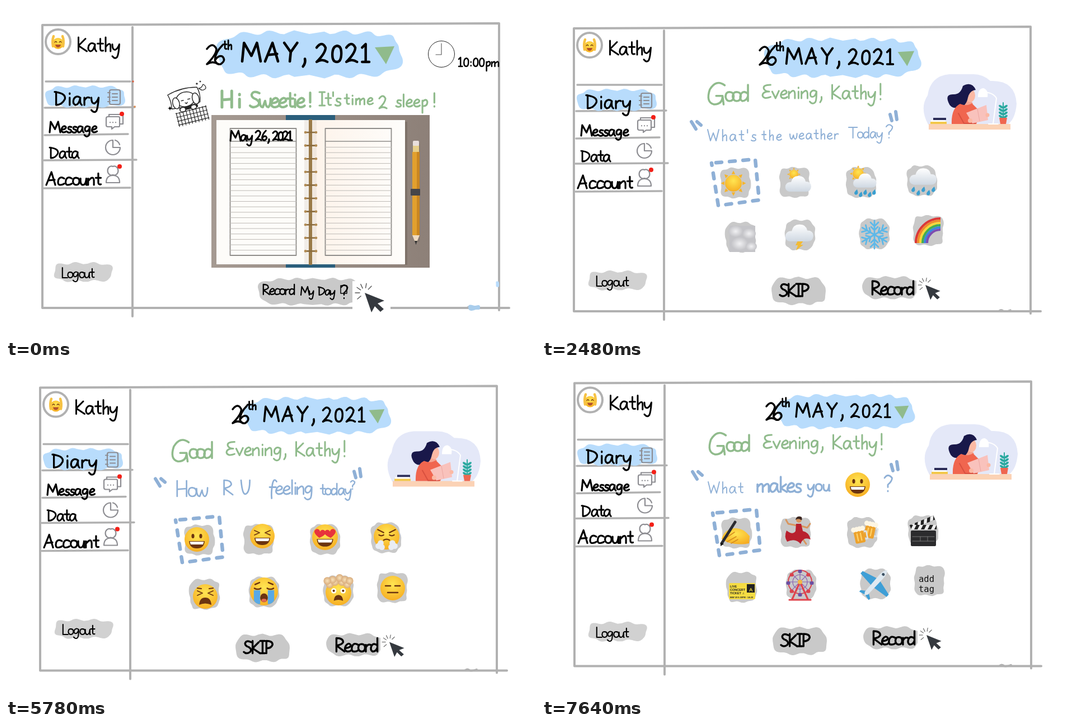
Recreate the animation shown at these times as an HTML page. Size 947 px wide and 592 px high, loop 8000 ms.

```html
<!DOCTYPE html>
<html lang="en">
<head>
<meta charset="utf-8">
<title>Diary wireframe</title>
<style>
html, body { margin: 0; width: 100%; height: 100%; overflow: hidden; background: #fff; }
svg { display: block; width: 100%; height: 100%; }
path, g { stroke-linecap: round; stroke-linejoin: round; }
</style>
</head>
<body>
<svg id="stage" viewBox="0 0 947 592"></svg>
<script>
const GRAY = '#b1b1b1', PATCH = '#c9c9c9', SKY = '#b8dcfc', GREEN = '#90bb8c', BLUE = '#8fb0d6', BROWN = '#6b3410', INK = '#000';

// Handwriting strokes: advance width | path, with cap height 10 and baseline y = 10.
const capitals = {
  A: '8|M0 10L4 0L7 10M1.5 6.5L6.5 6', D: '8|M1 1V10M0 1Q8 2 7 6Q5 10 1 10',
  E: '6|M6 0Q0 0 1 3Q2 5 5 5Q0 5 0 8Q1 11 6 9', G: '9|M8 1Q4-2 1 3Q-1 9 3 10Q7 10 7 6L4 6M7 6L7.5 10',
  H: '8|M1 0V10M7 0V10M1 5.5L7 5', I: '4|M0 0H4M2 0V10M0 10H4', K: '7|M1 0V10M6 1L1 6L7 10',
  L: '6|M1 0V10H6', M: '10|M0 10L1 0L5 7L8 0L10 10', P: '6|M1 10V0Q6 0 6 3Q5 6 1 6',
  R: '7|M1 10V0Q6 0 6 3Q5 5 1 5.5L7 10', S: '6|M6 1Q2-1 1 2Q1 4 4 5Q7 7 5 9Q2 11 0 9',
  T: '8|M0 0H8M4 0V10', V: '7|M0 0Q1 12 4 9Q6 7 6 0', W: '10|M0 0L2.5 10L5 3L7.5 10L10 0',
  Y: '7|M0 0L3.5 5L7 0M3.5 5L3 10'
};
const smalls = {
  a: '6|M5 5Q2 3 .5 6Q-.5 9 1.5 10Q4 10 5 5Q4.5 9 6 10', c: '5|M5 5Q2 3 .5 6Q-.5 10 2 10Q4 10 5 9',
  d: '6|M5 5.5Q2 3 .5 6Q-.5 9 1.5 10Q4 10 5 7M5 0V10', e: '5|M.5 7.5Q5 7 4.5 5Q3 3 1 5.5Q-1 9 2 10Q4 10 5 9',
  f: '4|M5 1Q3-2 2 3Q1 9 1.5 13M0 5H4.5', g: '6|M5 5Q2 3 .5 6Q0 9 2 9Q4 9 5 5Q5 12 4 13Q2 15 0 12.5',
  h: '5|M1 0V10M1 7Q4 3 4.5 6V10', i: '2|M1 5V10M1 2V2.4', k: '5|M1 0V10M4.5 5L1 7.5L5 10', l: '2|M1 0V10',
  m: '8|M0 5V10M0 7Q3 3 3.5 6V10M3.5 7Q7 3 7.5 6V10', n: '5|M0 5V10M0 7Q4 2 4.5 6.5V10',
  o: '5|M3 4.5Q0 4 0 7.5Q.5 10 2.5 10Q5 10 5 7Q5 4.5 2.5 4.5', p: '5|M1 5V15M1 6Q4 3 5 6Q5 10 1 9.5',
  r: '4|M.5 5V10M.5 7Q2 4 4 5', s: '4|M4 5Q1 4 1 6Q1 7 3 7.5Q5 9 3 10Q1 10.5 0 9.5',
  t: '4|M2 1V8Q2 10 4 9.5M0 4.5H4', u: '5|M0 5Q-.5 10 2 10Q4 10 4.5 5V10H5', v: '5|M0 5L2.5 10L5 4.5',
  w: '7|M0 5Q0 10 2 10L3.5 6Q4 10 5.5 10Q7 9 7 4.5', y: '5|M0 5Q0 9 2 9Q4 8 5 5Q4.5 12 3.5 14Q2 16 0 13.5'
};
const signs = {
  0: '5|M3 1Q0 1 0 6Q0 10 2.5 10Q5 10 5 5Q5 1 2.5 1', 1: '4|M0 2L2 0V10M0 10H4',
  2: '6|M0 2Q3-2 5 2Q5 5 0 10Q3 8 6 10', 6: '5|M4 0Q0 4 0 8Q1 10.5 3 10Q6 8 4 6Q2 5 0 8',
  ',': '2|M1.5 9Q2 11 .5 13', '!': '2|M1 0V7M1 9.6V10', "'": '2|M1 0V3', ':': '2|M1 5V5.3M1 9V9.4',
  '?': '5|M0 2Q2-1 4.5 2Q4.5 4 2 6V7.5M2 9.7V10'
};
const glyphs = { ...capitals, ...smalls, ...signs };

const fill = (d, c) => `<path d="${d}" fill="${c}"/>`;
const line = (d, c, w, extra = '') => `<path d="${d}" fill="none" stroke="${c}" stroke-width="${w}" ${extra}/>`;
const oval = (x, y, rx, ry, c, extra = '') => `<ellipse cx="${x}" cy="${y}" rx="${rx}" ry="${ry}" fill="${c}" ${extra}/>`;
const dot = (x, y, r, c, extra) => oval(x, y, r, r, c, extra);
const rect = (x, y, w, h, c, extra = '') => `<rect x="${x}" y="${y}" width="${w}" height="${h}" fill="${c}" ${extra}/>`;
const at = (x, y, body, s = 1, turn = 0) => `<g transform="translate(${x} ${y}) rotate(${turn}) scale(${s})">${body}</g>`;
const repeat = (n, draw) => Array.from({ length: n }, (_, i) => draw(i)).join('');
const outline = (c, w) => `stroke="${c}" stroke-width="${w}"`;

function hand(text, x, baseline, size, gap, color, width) {
  let pen = 0;
  const letters = [...text].map(ch => {
    const [advance, d] = glyphs[ch].split('|');
    const letter = `<path d="${d}" transform="translate(${pen} 0)"/>`;
    pen += +advance + gap;
    return letter;
  }).join('');
  return `<g aria-label="${text}" fill="none" ${outline(color, width * 10 / size)}>${at(x, baseline - size, letters, size / 10)}</g>`;
}

// Marker scribble: rounded box with a softly wavy rim.
function blob(x, y, w, h, color, ripple = 3.5, depth = 1.3) {
  const curve = v => Math.sign(v) * Math.abs(v) ** .5;
  const points = Array.from({ length: 240 }, (_, i) => {
    const a = i / 120 * Math.PI;
    const u = curve(Math.cos(a)), v = curve(Math.sin(a));
    const px = x + w / 2 * (1 + u), py = y + h / 2 * (1 + v);
    const wave = depth * Math.sin(px / ripple + 2 * Math.sin(py / ripple / 2));
    return (px + wave * u).toFixed(1) + ' ' + (py + wave * v).toFixed(1);
  });
  return fill('M' + points.join('L') + 'Z', color);
}

function avatar() {
  return dot(93, 64, 22, '#fff', outline(GRAY, 4)) + dot(93, 67, 10, 'url(#skin)') +
    line('M84 72Q82 62 85 54M102 72Q104 62 101 54', '#f6c244', 4.5) +
    line('M87 65Q89 62 91 65M95 65Q97 62 99 65', BROWN, 1.3) + fill('M88 69H98Q97 74 93 74Q89 74 88 69', '#b4512a');
}

function sidebar() {
  const icon = d => line(d, '#8d8d92', 2.2);
  return line('M65 64V34L881 31V544M65 34V540L899 540M226 38V555', GRAY, 4) +
    line('M71 135H222M69 182L230 181M69 231L218 229M68 276L233 275M68 326L222 325M825 539Q829 536 833 540Q839 541 845 538', GRAY, 3.4) +
    avatar() + hand('Kathy', 127, 81, 25, .8, INK, 3) +
    blob(72, 144, 141, 36, SKY, 5, 2) + hand('Diary', 87, 177, 26, 1.3, INK, 3.3) +
    hand('Message', 78, 226, 19, .75, INK, 3.2) + hand('Data', 78, 272, 21, .3, INK, 2.9) + hand('Account', 72, 320, 23, .9, INK, 3.2) +
    icon('M188 150H201Q204 150 204 153V173Q204 176 201 176H188Q185 176 185 173V153Q185 150 188 150ZM190 157H199M190 163H199M190 169H199M182 155H186M182 163H186M182 171H186') +
    icon('M182 198H201Q203 198 203 200V214Q203 216 201 216H194L189 220V216H182Q179 216 179 213V201Q179 198 182 198ZM184 198V194H209V211H204M186 208V208.3M191 208V208.3M196 208V208.3') +
    icon('M191 240A13 13 0 1 0 204 253H191ZM195 240A12 12 0 0 1 203 248') +
    icon('M191 287A7 8 0 1 0 191 302A7 8 0 1 0 191 287M179 316Q179 303 191 303Q203 303 203 316Z') +
    dot(207, 193, 4, '#f32018') + dot(203, 287, 4, '#f32018');
}

const logout = blob(86, 460, 104, 32, '#d1d1d1', 5, 2) + hand('Logout', 99, 486, 18, .3, INK, 2.1);

function dateHeader(x, y, scale, dayX, dayBase, daySize) {
  const body = blob(2, 3, 328, 79, SKY, 7, 3.5) + fill('M283 30L318 28L303 60Z', GREEN);
  return at(x, y, body, scale) +
    hand('MAY', x + 46 * scale, y + 55 * scale, 33 * scale, 2.4, INK, 4.6 * scale) +
    hand(',', x + 153 * scale, y + 54 * scale, 34 * scale, 0, INK, 4.6 * scale) +
    hand('2021', x + 179 * scale, y + 56 * scale, 32 * scale, 2.8, INK, 4.4 * scale) +
    hand('26', dayX, dayBase, daySize, -1.8, INK, 3.5) + hand('th', dayX + daySize * .85, dayBase - daySize * .78, 16, .8, INK, 2.8);
}

function cursor(x, y, scale) {
  const rays = [140, 180, 215, 245, 280, 315].map(a => `<g transform="rotate(${a})">${line('M9 0H17', '#555', 1.4)}</g>`).join('');
  return at(x, y, rays + fill('M0 0L35 14L23 19L34 29L28 34L18 24L12 35Z', '#35393f'), scale);
}

function puppy() {
  const ink = (d, w = 1.4) => line(d, '#222', w);
  const body = ink('M-31-25Q-4-33 23-26Q27-13 22 1Q-4 5-30 1Q-27-12-31-25Z') +
    oval(-2, -10, 17, 13, '#fff', outline('#222', 1.4)) +
    oval(-20, -7, 6, 10, '#fff', outline('#222', 1.4)) + oval(16, -7, 6, 10, '#fff', outline('#222', 1.4)) +
    ink('M-10-9H-6M2-9H6M-4-4L-2-2L0-4') + rect(-17, 3, 34, 6, '#222', 'rx="3"') +
    oval(-11, 7, 5, 4, '#fff', outline('#222', 1.4)) + oval(9, 7, 5, 4, '#fff', outline('#222', 1.4)) +
    repeat(10, i => ink(`M${-24 + i * 6} 10V35`, 1.2)) + repeat(4, i => ink(`M-25 ${11 + i * 7}H31`, 1.2));
  const star = 'M0-5Q0 0 5 0Q0 0 0 5Q0 0-5 0Q0 0 0-5Z';
  return at(325, 176, body, 1, -14) + at(293, 183, fill(star, INK)) + at(341, 139, fill(star, INK), .6) +
    at(347, 135, fill(star, INK), .5) + ink('M352 140Q349 148 344 147Q352 154 357 147Q357 142 352 140Z', 1.2);
}

function notebook() {
  const page = x => rect(x, 219, 118, 227, 'none', outline('#8f8d8a', 1.8)) + line(`M${x} 242H${x + 118}`, '#8f8d8a', 1.5) +
    repeat(20, i => line(`M${x} ${252.5 + i * 9.7}H${x + 118}`, '#bdbab6', 1));
  const ring = i => {
    const y = 226 + i * 23.6;
    return line(`M536 ${y}H553`, '#8a6b3d', 2.6) + dot(535, y, 2.3, '#b28b52') + dot(554, y, 2.3, '#b28b52');
  };
  const pencil = line('M735 248V418', '#6f635b', 9, 'opacity=".35"') + rect(727, 241, 11, 10, '#e9dfdc', 'rx="2"') +
    rect(727, 250, 11, 12, '#e7cf8a') + rect(726, 261, 13, 149, '#e2a02e') + rect(734, 261, 5, 149, '#c98622') +
    fill('M726 410H739L732.5 426Z', '#f0dcc2') + fill('M730 420H735L732.5 427Z', '#333') + rect(723, 327, 17, 12, '#46464a', 'rx="1"');
  return rect(367, 195, 390, 273, 'url(#table)') + rect(500, 195, 88, 273, '#2b5f7c') +
    rect(712, 207, 5, 256, '#6e6259', 'opacity=".5"') + rect(376, 204, 168, 258, '#fdfcf9') + rect(545, 204, 168, 258, 'url(#page)') +
    rect(533, 204, 22, 258, '#d9d2c8', 'opacity=".35"') + rect(541, 203, 6, 260, '#9a7a48') +
    page(400.5) + page(570.5) + repeat(10, ring) + pencil +
    hand('May', 401, 241, 18, .3, INK, 3) + hand('26,', 446, 240, 17, .8, INK, 3) + hand('2021', 477, 240, 16, .1, INK, 3);
}

function home() {
  return dateHeader(376, 44, 1, 359, 104, 34) +
    dot(778, 86, 23.5, '#fff', outline('#222', 1)) + line('M778 67V87H768', '#555', 1.1) + hand('10:00pm', 809, 108, 16, 1.8, INK, 2.5) +
    puppy() + hand('Hi', 383, 181, 29, 2.8, GREEN, 5) + hand('Sweetie', 436, 181, 28, .15, GREEN, 4.2) + hand('!', 541, 180, 25, 0, GREEN, 4.2) +
    hand("It's", 560, 178, 24, .6, GREEN, 3.1) + hand('time', 605, 176, 20, 2.1, GREEN, 3.1) + hand('2', 667, 183, 22, 0, GREEN, 3.1) +
    hand('sleep', 697, 180, 22, 1.1, GREEN, 3.1) + hand('!', 763, 180, 24, 0, GREEN, 3.3) + notebook() +
    blob(451, 488, 194, 46, PATCH, 5, 2) + hand('Record', 458, 516, 18, .15, INK, 2.3) + hand('My', 527, 517, 15, 0, INK, 2.2) +
    hand('Day', 558, 517, 16, -.3, INK, 2.2) + hand('?', 599, 523, 25, 0, INK, 2.3) + line('M598 500V514H609V500Z', INK, 1.5) +
    rect(619, 492, 68, 60, '#fff') + cursor(641, 513, 1) +
    dot(227, 135, 1.7, '#d65a3c') + dot(230, 180, 1.8, '#e08a4c') + blob(827, 535, 19, 9, '#a9cdec', 3, 1) + blob(875, 492, 6, 11, SKY, 3, .5);
}

function reader() {
  const leaves = repeat(4, i => oval(820, 180 + i * 6, 4.5, 2, '#2ba9a0', `transform="rotate(35 820 ${180 + i * 6})"`) +
    oval(828, 180 + i * 6, 4.5, 2, '#2ba9a0', `transform="rotate(-35 828 ${180 + i * 6})"`));
  return fill('M690 212Q674 182 689 160Q694 125 728 122H771Q788 122 801 134Q846 132 848 175Q846 202 832 212Z', '#e4e8f8') +
    rect(691, 211, 146, 10, '#fbd2b5') + rect(699, 200, 23, 4, '#2b2c58') + rect(695, 204, 26, 4, '#fff') + rect(694, 207, 29, 4, '#f3c84b') +
    line('M787 154Q806 154 812 165L806 211M798 211H815', '#fff', 2) + fill('M779 163Q779 147 789 147Q798 150 796 163Z', '#fff') +
    fill('M760 164L770 174L765 184L749 183L754 168Z', '#f5a491') + oval(765, 160, 9, 12, '#fbb9a4') +
    fill('M775 150Q768 134 752 143Q748 158 736 158Q720 157 726 172Q731 186 747 181Q758 179 761 164Q764 151 775 150Z', '#19184a') +
    fill('M732 211Q731 183 747 175Q759 180 768 174L784 190L776 211Z', '#f0664f') +
    line('M744 192L754 210H774', '#d9503f', 2) + fill('M758 191L794 177L797 204L769 210Z', '#f9c2bc') + line('M778 184L782 206', '#eda7a2', 1) +
    dot(765, 205, 4, '#fbb9a4') + dot(796, 195, 3.5, '#fbb9a4') + line('M824 173V201', '#2ba9a0', 2) + leaves + fill('M817 200H831L829 211H819Z', '#ef6650');
}

const tiles = [[319, 290], [425, 289], [543, 289], [652, 286], [328, 387], [434, 383], [567, 381], [664, 375]];

function questionPage() {
  return hand('G', 296, 176, 38, 0, GREEN, 3.6) + hand('ood', 328, 170, 29, -.6, GREEN, 3.6) + hand('Evening,', 394, 165, 24, 1.2, GREEN, 3) +
    hand('Kathy', 516, 166, 25, 1.2, GREEN, 3) + hand('!', 602, 167, 28, 0, GREEN, 3) + reader() +
    line('M267 207L275 220M277 207L284 213M622 194L625 205M632 189L634 203', BLUE, 6) +
    line('M303 281L381 274L388 347L315 357Z', BLUE, 6.5, 'stroke-dasharray="10 14.2" stroke-dashoffset="-8"') +
    tiles.map(([x, y]) => blob(x, y, 53, 53, PATCH)).join('') +
    blob(412, 486, 93, 47, PATCH, 5, 2) + hand('SKIP', 425, 519, 22, .1, INK, 3.4) +
    blob(574, 485, 97, 38, PATCH, 5, 2) + hand('Record', 588, 516, 24, .1, INK, 3.4) + rect(669, 486, 44, 46, '#fff') + cursor(685, 499, .76);
}

const sun = (x, y, r) => at(x, y, repeat(8, i => `<g transform="rotate(${i * 45})">${fill(`M${-r * .22} ${-r * 1.08}L0 ${-r * 1.5}L${r * .22} ${-r * 1.08}Z`, '#f6b42a')}</g>`) + dot(0, 0, r, 'url(#skin)'));
const cloud = (x, y, s) => at(x, y, fill('M-16 13Q-25 11-23 2Q-20-5-13-4Q-10-16 1-15Q11-15 13-5Q23-5 23 4Q22 13 14 13Z', 'url(#cloud)'), s);
const drop = (x, y) => at(x, y, fill('M2-5Q5 2 2 4Q-2 6-3 2Q-3-1 2-5Z', '#3a9fd0'));

function weather() {
  const colors = ['#dc3838', '#f08a2c', '#f6d83a', '#45ae4c', '#3c86dc', '#7d4cb0'];
  const flakeArm = line('M0 0V-25M-7-22L0-15L7-22M-6-14L0-8L6-14', '#5db8e8', 2.8);
  const fog = [[346, 403, 13], [370, 407, 12], [353, 425, 15], [374, 430, 10]].map(([x, y, r]) => oval(x, y, r, r * .8, 'url(#mist)')).join('');
  return hand("What's", 296, 241, 20, 2.4, BLUE, 2) + hand('the', 393, 240, 18, 2.7, BLUE, 2) + hand('weather', 443, 238, 18, 2, BLUE, 2) +
    hand('Today', 548, 236, 19, .4, BLUE, 2.1) + hand('?', 615, 236, 25, 0, BLUE, 2.1) +
    sun(342, 317, 15) + sun(450, 301, 8) + cloud(458, 319, 1) + sun(565, 300, 10) + cloud(577, 313, .9) +
    repeat(5, i => drop(561 + i * 8, 333 + i % 2 * 4)) + cloud(681, 306, 1.05) + repeat(5, i => drop(663 + i * 9, 328 + i % 2 * 6)) +
    rect(335, 393, 46, 47, '#c4c4c8') + fog + fill('M457 420H467L462 427H467L454 437L457 428H453Z', '#f2bb35') + cloud(460, 407, 1.08) +
    at(594, 409, repeat(6, i => `<g transform="rotate(${i * 60})">${flakeArm}</g>`)) +
    colors.map((c, i) => line(`M${668 + i * 4} 424A${44 - i * 4} ${44 - i * 4} 0 0 1 712 ${380 + i * 4}`, c, 4.2, 'style="stroke-linecap:butt"')).join('');
}

const face = (x, y, r, features) => at(x, y, dot(0, 0, 22, 'url(#skin)') + features, r / 22);
const brown = (d, w = 2.2) => line(d, BROWN, w);
const smile = fill('M-14 3H14Q13 16 0 16Q-13 16-14 3Z', BROWN) + fill('M-12.5 4H12.5L11 9H-11Z', '#fff');
const roundEyes = oval(-7, -6, 2.6, 4, BROWN) + oval(7, -6, 2.6, 4, BROWN);
const squint = brown('M-14-10L-5-6L-14-2M14-10L5-6L14-2', 1.9);
const grin = (x, y) => face(x, y, 22, roundEyes + smile);

function feelings() {
  const heart = 'M0 8Q-17-2-7-8Q-2-9 0-4Q2-9 7-8Q17-2 0 8Z';
  const puffs = [[-10, 11], [10, 11], [-14, 16], [14, 16], [-8, 18], [8, 18]].map(([x, y]) => dot(x, y, 5, '#e9edf4')).join('');
  const tears = fill('M-16-2H-6V20Q-13 20-16 14ZM16-2H6V20Q13 20 16 14Z', '#58a9e6');
  const plume = [[-15, -14], [-6, -18], [6, -18], [15, -14], [-10, -22], [2, -25], [11, -22], [-19, -20], [19, -20]]
    .map(([x, y]) => dot(x, y, 6.5, 'url(#ash)')).join('');
  return hand('How', 303, 235, 28, .2, BLUE, 2.7) + hand('R', 387, 232, 26, 0, BLUE, 2.7) + hand('V', 420, 232, 26, 0, BLUE, 2.7) +
    hand('feeling', 471, 231, 25, .35, BLUE, 2.8) + hand('today', 562, 232, 20, .3, BLUE, 2.6) + hand('?', 616, 222, 16, 0, BLUE, 2.3) +
    grin(341, 312) + face(458, 306, 22, squint + smile) +
    face(570, 308, 23, at(-9, -6, fill(heart, '#e8333c'), .9, 8) + at(9, -6, fill(heart, '#e8333c'), .9, -8) + smile) +
    face(680, 307, 23, brown('M-15-12L-5-7M15-12L5-7M-13-3Q-9 0-5-3M13-3Q9 0 5-3M-5 6Q0 3 5 6') + puffs) +
    face(356, 414, 22, squint + brown('M-14-15L-7-14M14-15L7-14') + fill('M-11 15Q-10 2 0 2Q10 2 11 15Q0 10-11 15Z', BROWN)) +
    face(461, 405, 25, tears + brown('M-15-5Q-10-2-5-5M15-5Q10-2 5-5M-14-11L-7-14M14-11L7-14') + oval(0, 10, 6, 7, BROWN) + oval(0, 14, 4, 2.5, '#e66b52')) +
    face(594, 407, 23, plume + dot(-8, -3, 4.5, '#fff') + dot(8, -3, 4.5, '#fff') + dot(-8, -3, 2, BROWN) + dot(8, -3, 2, BROWN) + fill('M-8 14Q-7 4 0 4Q7 4 8 14Q0 11-8 14Z', BROWN)) +
    face(691, 399, 22, brown('M-13-4H-4M13-4H4M-9 8H9', 2.5));
}

function clapper() {
  const bar = turn => at(659, 292, rect(0, -6, 46, 8, '#222') + repeat(4, i => fill(`M${4 + i * 12}-6H${10 + i * 12}L${6 + i * 12} 2H${i * 12}Z`, '#eee')), 1, turn);
  return bar(-22) + bar(0) + rect(659, 296, 45, 28, '#2b2b2d', 'rx="2"') + line('M662 307H701M662 315H701M676 307V315M689 307V315', '#777', 1);
}

function ferrisWheel() {
  const spoke = i => {
    const a = i * Math.PI / 4, x = 461 + 21 * Math.cos(a), y = 388 + 21 * Math.sin(a);
    return line(`M461 388L${x} ${y}`, '#8a62b0', 1.2) + rect(x - 3.5, y - 1, 7, 6, i % 2 ? '#d9434d' : '#6d4ea2', 'rx="2"');
  };
  return dot(461, 388, 21, 'none', outline('#d9434d', 2)) + dot(461, 388, 13, 'none', outline('#8a62b0', 1.2)) + repeat(8, spoke) +
    line('M461 388L447 419M461 388L475 419M442 420H480', '#e0444c', 3.2) + dot(461, 388, 4, '#f2b843');
}

function reasons() {
  const label = (text, x, y, size, c = '#222') => `<text x="${x}" y="${y}" font-size="${size}" font-weight="700" font-family="Liberation Sans, sans-serif" fill="${c}">${text}</text>`;
  const beer = (x, y, turn) => at(x, y, line('M9-6H15V9H9', '#dfe4e8', 3) + rect(-10, -12, 20, 27, '#eda22c', 'rx="3"') +
    line('M-4-4V10M3-4V10', '#ffd36b', 2.5) + repeat(4, i => dot(-9 + i * 6, -13, 5, '#fdf6e4')), .9, turn);
  const writing = fill('M321 311Q326 293 345 292Q359 291 371 306L370 319Q352 323 331 317Z', 'url(#skin)') + line('M326 311L344 299M331 316L347 307M338 319L350 312', '#d78d1e', 1.6) +
    line('M321 319L345 281', '#2b2b30', 5) + fill('M319 318L325 320L319 324Z', '#111');
  const dancer = line('M455 287L440 284L436 277M460 287L474 291L479 284M463 307L472 320', '#d9965f', 3) + dot(459, 277, 5, '#d9965f') +
    fill('M453 277Q455 268 464 272Q466 280 461 276Q457 274 453 277Z', '#3b2620') +
    fill('M454 284H463L466 297Q477 299 480 312Q467 306 462 320Q453 309 438 316Q432 307 437 296Q448 305 453 297Z', '#b9202e');
  const ticket = rect(334, 390, 47, 29, '#f5dc43', 'rx="2"') + rect(366, 392, 14, 15, '#222') + label('A', 370, 405, 9, '#f5dc43') +
    label('LIVE', 336, 398, 5.5) + label('CONCERT', 336, 404, 5.5) + label('TICKET ♫', 336, 410, 5.5) + label('MAY 20 6:30PM · 1A 20', 336, 417, 3.8);
  const plane = at(595, 391, fill('M-4-10L-33-2V4L-4 7L-3 21L-12 27V31L0 28L12 31V27L3 21L4 7L33 4V-2L4-10Z', '#3f9fd6') + fill('M0-34Q5-30 5-18L4 24L0 30L-4 24L-5-18Q-5-30 0-34Z', '#dfe9f1') + fill('M-3-24Q0-28 3-24L2-21H-2Z', '#3d5264'), .95, 42);
  const tag = `<text font-family="DejaVu Sans Mono, monospace" font-size="15.5" fill="#111" text-anchor="middle"><tspan x="687" y="388">add</tspan><tspan x="687" y="406">tag</tspan></text>`;
  return hand('What', 297, 229, 20, 2, BLUE, 1.9) + hand('makes', 385, 227, 27, .2, BLUE, 3.6) + hand('you', 475, 225, 22, 1.4, BLUE, 3.1) +
    grin(564, 214) + hand('?', 612, 226, 30, .2, BLUE, 2.8) +
    writing + dancer + beer(586, 296, 12) + beer(567, 305, -12) + clapper() + ticket + ferrisWheel() + plane + tag;
}

const gradient = (id, kind, from, to, extra = '') => `<${kind}Gradient id="${id}" ${extra}><stop offset="0" stop-color="${from}"/><stop offset="1" stop-color="${to}"/></${kind}Gradient>`;
const defs = '<defs>' + gradient('skin', 'radial', '#ffe552', '#f6ab20', 'cy=".35" r=".7"') + gradient('cloud', 'linear', '#ffffff', '#cfd8e2', 'x2="0" y2="1"') +
  gradient('mist', 'radial', '#f1f1f3', '#c4c4c8') + gradient('ash', 'radial', '#f8e2bb', '#d9ac7c') +
  gradient('table', 'linear', '#a59a92', '#8d8078') + gradient('page', 'linear', '#fdf3ea', '#fefdfb') + '</defs>';

const scenes = [
  { until: 500, side: [0, 0], exit: [0, 0], body: home() },
  { until: 3800, side: [-8, 6], exit: [-3, 15], body: dateHeader(398, 57, .84, 389, 105, 32) + questionPage() + weather() },
  { until: 7100, side: [-4, 6.5], exit: [1, -4], body: dateHeader(425, 57, .79, 405, 104, 31) + at(0, -3.5, questionPage()) + feelings() },
  { until: 8000, side: [-7, -1.5], exit: [-3, 1], body: dateHeader(420, 52, .74, 401, 98, 30) + at(2, -16, questionPage()) + reasons() }
];

const stage = document.getElementById('stage');
stage.innerHTML = defs + scenes.map(s => `<g>${at(...s.side, sidebar())}${at(...s.exit, logout)}${s.body}</g>`).join('');
const layers = stage.querySelectorAll(':scope > g');

function show() {
  const time = performance.now() % 8000;
  const current = scenes.findIndex(s => time < s.until);
  layers.forEach((layer, i) => layer.style.display = i === current ? '' : 'none');
  requestAnimationFrame(show);
}
show();
</script>
</body>
</html>
```
